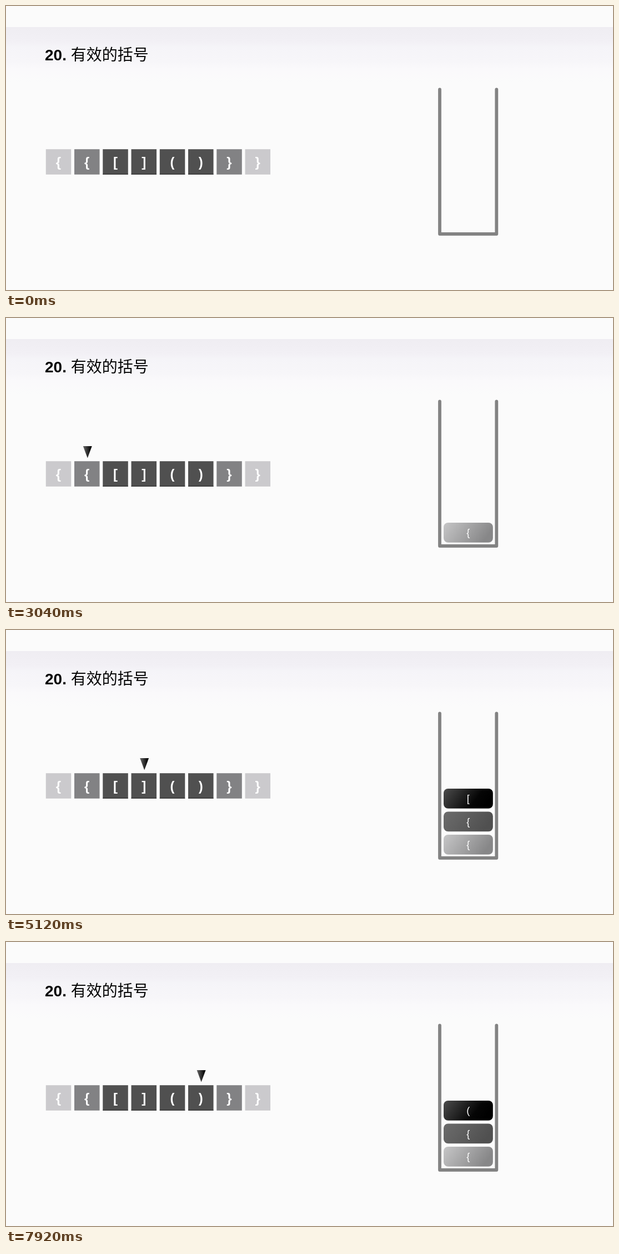
An HTML page that plays this animation: 1093x512 px, repeating every 8000 ms.

```html
<!DOCTYPE html>
<html lang="zh-CN">
<head>
<meta charset="utf-8">
<title>有效的括号</title>
<style>
html, body { margin: 0; width: 100%; height: 100%; overflow: hidden; background: #fbfbfb; }
svg { display: block; width: 100%; height: 100%; }
text { font-family: "Liberation Sans", "Noto Sans CJK SC", "Noto Sans CJK", sans-serif; }
.title { font-size: 28px; font-weight: 700; fill: #050505; }
.title .han { font-family: "Noto Sans CJK SC", "Noto Sans CJK", sans-serif; font-weight: 500; }
.tile text { font-size: 24px; font-weight: 700; }
.block text { font-size: 18px; }
.tile text, .block text { fill: #fff; text-anchor: middle; }
</style>
</head>
<body>
<svg id="stage" viewBox="0 0 1093 512" preserveAspectRatio="none">
  <defs>
    <linearGradient id="band" x2="0" y2="1">
      <stop offset="0" stop-color="#efedf2"/>
      <stop offset=".26" stop-color="#f2f0f5"/>
      <stop offset=".36" stop-color="#f5f4f8"/>
      <stop offset=".62" stop-color="#f7f6f9"/>
      <stop offset=".75" stop-color="#faf9fb"/>
      <stop offset="1" stop-color="#fbfbfb"/>
    </linearGradient>
    <linearGradient id="light" y2=".3"><stop stop-color="#c6c6c7"/><stop offset="1" stop-color="#878788"/></linearGradient>
    <linearGradient id="mid" y2=".3"><stop stop-color="#6c6c6c"/><stop offset="1" stop-color="#505050"/></linearGradient>
    <linearGradient id="dark" y2=".3"><stop stop-color="#4c4c4c"/><stop offset=".75" stop-color="#050505"/><stop offset="1" stop-color="#000"/></linearGradient>
    <linearGradient id="tip"><stop stop-color="#686868"/><stop offset=".8" stop-color="#0c0c0c"/></linearGradient>
  </defs>
  <rect width="1093" height="512" fill="#fbfbfb"/>
  <rect y="38" width="1093" height="100" fill="url(#band)"/>
  <text class="title" x="70" y="98" xml:space="preserve">20. <tspan class="han">有效的括号</tspan></text>
  <g id="tiles"></g>
  <path d="M781 150.5V411H883.3V150.5" fill="none" stroke="#838383" stroke-width="5.8" stroke-linecap="round" stroke-linejoin="round"/>
  <g id="blocks"></g>
  <path id="pointer" d="M-8 231H8L0 252.5Z" fill="url(#tip)"/>
</svg>
<script>
const LOOP = 8000, STEP = 80;
const PITCH = 51.25, LIFT = 304, MOVE = 320, SLIDE = 160;
const $ = id => document.getElementById(id);

function add(parent, tag, attrs, text) {
  const el = document.createElementNS("http://www.w3.org/2000/svg", tag);
  for (const key in attrs) el.setAttribute(key, attrs[key]);
  if (text) el.textContent = text;
  parent.appendChild(el);
  return el;
}

const shades = ["#cbcacd", "#828284", "#505050", "#505050"];
[..."{{[]()}}"].forEach((char, i) => {
  const depth = Math.min(i, 7 - i);
  const x = 71.8 + PITCH * i;
  const tile = add($("tiles"), "g", { class: "tile" });
  add(tile, "rect", { x, y: 258.2, width: 45.5, height: 45.6, fill: shades[i > 3 && depth > 1 ? 3 : depth] });
  if (depth > 1) add(tile, "rect", { x, y: 302.6, width: 45.5, height: 1.2, fill: "#303030" });
  add(tile, "text", { x: x + 22.6, y: 290 }, char);
});

const blocks = [
  { char: "{", y: 369, fill: "light", push: 1872 },
  { char: "{", y: 327.5, fill: "mid", push: 3265 },
  { char: "[", y: 286, fill: "dark", push: 4480, pop: 5910 },
  { char: "(", y: 286, fill: "dark", push: 7400 }
];
for (const block of blocks) {
  block.el = add($("blocks"), "g", { class: "block" });
  add(block.el, "rect", { x: 788, width: 88.8, height: 35.8, rx: 8, fill: `url(#${block.fill})` });
  add(block.el, "text", { x: 832.3, y: 24.3 }, block.char);
}

const SHOW = 1120;
const hops = [2240, 3640, 4800, 6400, 7740];

const progress = (t, start, length) => Math.max(0, Math.min(1, (t - start) / length));
const smooth = p => p * p * (3 - 2 * p);

function draw(t) {
  for (const { el, y, push, pop } of blocks) {
    const away = 1 - progress(t, push, MOVE) + (pop ? progress(t, pop, MOVE) : 0);
    el.setAttribute("transform", `translate(0 ${y - LIFT * away})`);
    el.setAttribute("opacity", 1 - away);
  }
  const place = hops.reduce((sum, start) => sum + smooth(progress(t, start, SLIDE)), 0);
  $("pointer").setAttribute("transform", `translate(${95.6 + 51.2 * place} 0)`);
  $("pointer").setAttribute("opacity", progress(t, SHOW, 240));
}

const began = performance.now();
function tick() {
  const t = (performance.now() - began) % LOOP;
  draw(Math.floor(t / STEP) * STEP);
  requestAnimationFrame(tick);
}
tick();
</script>
</body>
</html>
```
